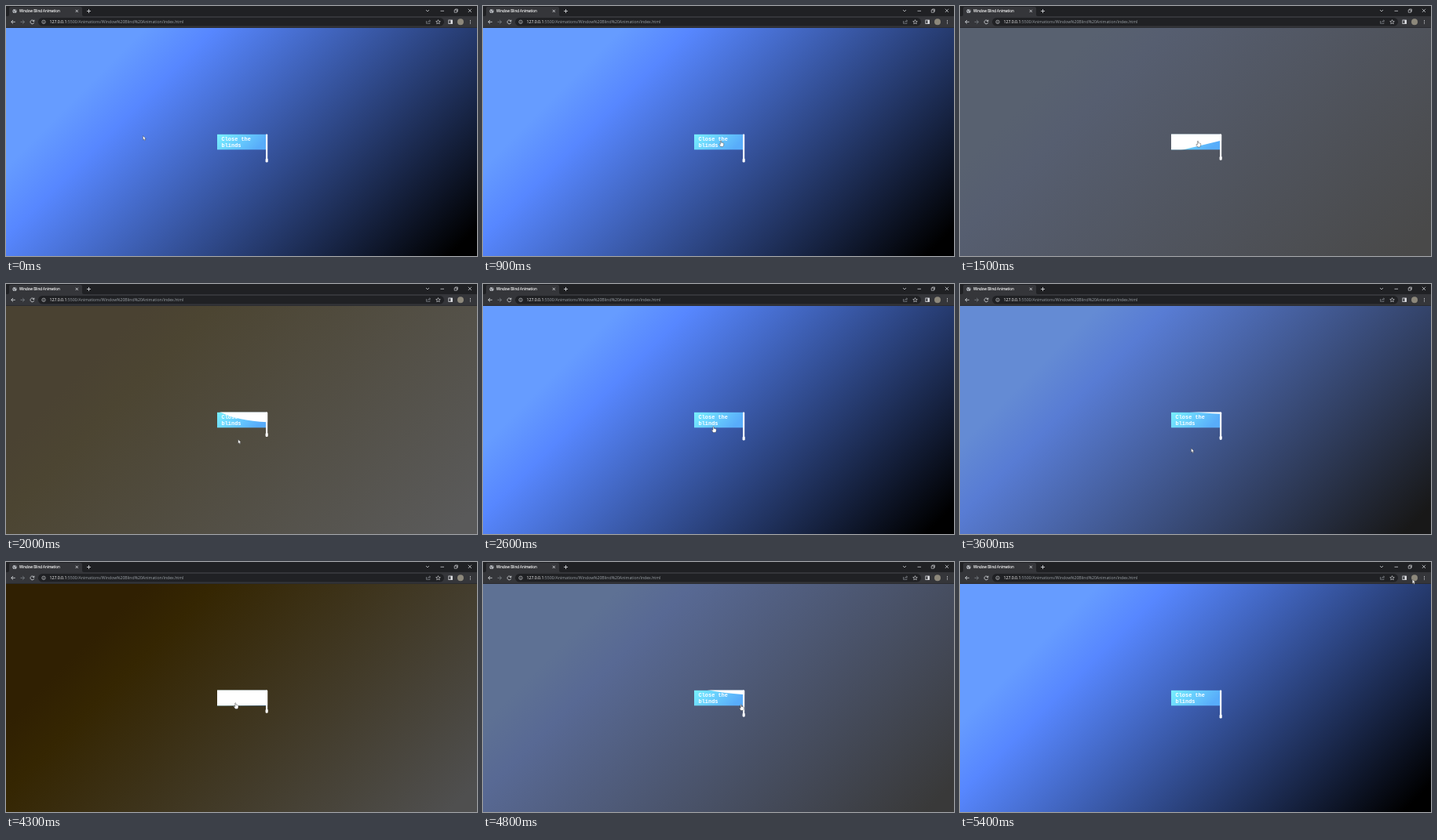
These frames come from a looping animation (600 by 319 pixels, 5500 ms). An HTML page:

```html
<!DOCTYPE html>
<html lang="en">
<head>
<meta charset="utf-8">
<title>Window Blind Animation</title>
<style>
  html, body { margin: 0; width: 100%; height: 100%; overflow: hidden; background: #202124; }
  svg { display: block; width: 600px; height: 319px; }
  .ui { font-family: "Open Sans", sans-serif; }
  .line { fill: none; stroke: #dfe1e5; stroke-width: .8; }
</style>
</head>
<body>
<svg viewBox="0 0 600 319">
  <defs>
    <linearGradient id="sky" gradientUnits="userSpaceOnUse" x1="77.25" y1="-49.75" x2="522.75" y2="395.75">
      <stop offset=".2"/><stop offset=".3"/><stop offset=".96"/>
    </linearGradient>
    <linearGradient id="glass" x1="0" y1="0" x2="1" y2=".3">
      <stop offset="0" stop-color="#78f0ff"/><stop offset="1" stop-color="#58acfa"/>
    </linearGradient>
    <clipPath id="frame"><path d="M269 163.5H332Q333.3 163.5 333.3 165V183.3H269Z"/></clipPath>
  </defs>

  <rect y="27.5" width="600" height="291.5" fill="url(#sky)"/>

  <g id="toolbar">
    <rect width="600" height="28" fill="#202124"/>
    <path d="M2 13Q4 13 4 11V3Q4 1 6 1H95Q97 1 97 3V11Q97 13 99 13H600V27.5H0V13Z" fill="#35363a"/>
    <rect x="41" y="15" width="517" height="10.6" rx="5.3" fill="#202124"/>
    <circle cx="11" cy="6.5" r="2.6" fill="#bdc1c6"/>
    <path d="M9 6l2 1.2v1.6M11.4 4.2l.6 1.4 1.2.3" fill="none" stroke="#35363a" stroke-width=".7"/>
    <g class="ui">
      <text x="17" y="8.3" font-size="4.52" fill="#fff" stroke="#fff" stroke-width=".1">Window Blind Animation</text>
      <text x="55.5" y="22.3" font-size="5.18" fill="#9aa0a6"><tspan fill="#fff">127.0.0.1</tspan>:5500/Animations/Window%20Blind%20Animation/index.html</text>
    </g>
    <g class="line">
      <path d="M88.7 4.8l3.2 3.2m0-3.2l-3.2 3.2M103 6.5h5M105.5 4v5"/>
      <path d="M535 5l2 2 2-2M553.5 6.3h4.5M588.8 3.8l4.2 4.2m0-4.2l-4.2 4.2" stroke-width=".7"/>
      <path d="M571.2 5h3.2v3.2h-3.2zM572.3 5V4h3.1v3.1h-1" stroke-width=".6"/>
      <path d="M11.7 20.3H6.8M9 18l-2.3 2.3L9 22.6"/>
      <path d="M18.5 20.3h4.9M21.2 18l2.3 2.3-2.3 2.3" stroke="#80868b"/>
      <path d="M35.5 19.2A2.4 2.4 0 1 0 35.7 21.2M35.9 17.7v1.8h-1.8"/>
      <circle cx="48" cy="20.3" r="2.2" stroke-width=".6"/>
      <path d="M48 20v1.5M48 18.9v.5" stroke-width=".6"/>
      <path d="M535.5 19v3.3h4.5v-1M537 21q.2-2 3.5-2M539.2 17.8l1.4 1.2-1.4 1.2" stroke="#9aa0a6" stroke-width=".6"/>
      <path d="M550.5 17.6l.8 1.8 2 .2-1.5 1.3.4 1.9-1.7-1-1.7 1 .4-1.9-1.5-1.3 2-.2z" stroke-width=".6"/>
      <rect x="563.9" y="18" width="4.6" height="4.6"/>
    </g>
    <rect x="566.4" y="18" width="2.2" height="4.6" fill="#dfe1e5"/>
    <circle cx="579" cy="20.3" r="4" fill="#8d887b"/>
    <path d="M591.5 18v.9m0 1v.9m0 1v.9" stroke="#dfe1e5" stroke-width="1"/>
  </g>

  <rect x="269" y="163.8" width="63" height="19.5" fill="url(#glass)"/>
  <g font-family="'Liberation Mono', 'Courier New', monospace" font-weight="bold" font-size="6.9" fill="#fff">
    <text x="274.6" y="171.8">Close the</text>
    <text x="274.6" y="180.4">blinds</text>
  </g>
  <path id="blind" fill="#fff" clip-path="url(#frame)"/>
  <g fill="#fff">
    <rect id="cord" x="331" y="163.5" width="2.2" rx=".9"/>
    <rect id="knob" x="330.6" width="3.1" height="5" rx="1.4"/>
  </g>

  <path id="arrow" d="M0 0V5.4L1.3 4.3 2.1 6.2 3 5.8 2.2 4H3.8Z" fill="#fff" stroke="#222" stroke-width=".35"/>
  <path id="hand" d="M-.6 .6Q0-.4.6.6V3Q1.3 2.4 1.7 3.1 2.4 2.6 2.8 3.4 3.6 3.1 3.7 4V5.8Q3.5 7.4 2.5 8H-.2Q-1.3 6.6-2.2 5-2.2 4-.6 5Z" fill="#fff" stroke="#222" stroke-width=".4"/>
</svg>

<script>
const LOOP = 5500, STEP = 100, FADE = 700;
const TOP = 163.8, HEIGHT = 19.5, LEFT = 269, RIGHT = 333.3;
const $ = id => document.getElementById(id);
const stops = document.querySelectorAll('#sky stop');
const skyColors = [[102, 156, 255], [87, 135, 255], [0, 0, 0]];

// [start, closed?]
const toggles = [[1330, 1], [1850, 0], [2600, 1], [3170, 0], [3750, 1], [4500, 0]];

// [time, x, y] of the pointer tip
const pointer = [
  [0, 174.5, 165.5], [150, 230, 180], [400, 384, 155], [500, 384, 155], [900, 303, 171.5],
  [1000, 303, 171.5], [1600, 303, 172], [1850, 297, 186], [2100, 295, 205], [2400, 294, 204],
  [2600, 293.5, 181.5], [3000, 293, 181], [3150, 293, 184], [3200, 292.5, 188.5],
  [3450, 295, 213], [3600, 294.5, 209.5], [3750, 292.5, 182], [4300, 292.3, 179.5],
  [4500, 293, 185], [4700, 300, 200], [5200, 576.3, 22.3], [5500, 576.3, 22.3]
];

const bezier = (a, b, s) => 3 * a * s * (1 - s) ** 2 + 3 * b * s * s * (1 - s) + s ** 3;

// The CSS "ease" curve
function ease(x) {
  if (x >= 1) return 1;
  let lo = 0, hi = 1;
  for (let i = 0; i < 24; i++) {
    const mid = (lo + hi) / 2;
    if (bezier(.25, .25, mid) < x) lo = mid; else hi = mid;
  }
  return bezier(.1, 1, lo);
}

function blindState(t) {
  let closed = 0, closing = 0;
  toggles.forEach(([start, target], i) => {
    if (t < start) return;
    const end = Math.min(t, toggles[i + 1]?.[0] ?? t);
    closed += (target - closed) * ease((end - start) / FADE);
    closing = target;
  });
  return { closed, closing };
}

function pointerAt(t) {
  const i = pointer.findIndex(p => p[0] > t);
  const [t0, x0, y0] = pointer[i - 1], [t1, x1, y1] = pointer[i];
  const k = (t - t0) / (t1 - t0), s = k * k * (3 - 2 * k);
  return [x0 + (x1 - x0) * s, y0 + (y1 - y0) * s];
}

function drawSky(closed) {
  skyColors.forEach((rgb, i) => {
    const mixed = rgb.map(v => (v * (1 - 2 * closed) + 255 * closed) * (1 - .7 * closed));
    stops[i].setAttribute('stop-color', `rgb(${mixed.map(Math.round)})`);
  });
}

// The left side runs ahead of the right in both directions.
function drawBlind({ closed, closing }) {
  const lead = closing
    ? .85 * Math.sin(Math.PI * closed)
    : -1.6 * (1 - closed) ** .4 * closed ** .73;
  const y = part => TOP + HEIGHT * part;
  const middle = closing ? closed + lead / 2 : closed + lead * .4 * (1 - closed);
  const bendX = closing ? (LEFT + RIGHT) / 2 : LEFT + 22;
  $('blind').setAttribute('d',
    `M${LEFT} ${TOP - 20}V${y(closed + lead)}Q${bendX} ${y(middle)} ${RIGHT} ${y(closed)}V${TOP - 20}Z`);
  $('blind').style.display = closed > .001 ? '' : 'none';
  const tip = 199.6 - 7 * closed;
  $('cord').setAttribute('height', tip - 165.5);
  $('knob').setAttribute('y', tip - 5);
}

function drawPointer(t) {
  const [x, y] = pointerAt(t);
  const over = x > LEFT && x < RIGHT && y > TOP && y < TOP + HEIGHT;
  for (const id of ['arrow', 'hand']) {
    $(id).setAttribute('transform', `translate(${x} ${y})`);
    $(id).style.display = (id === 'hand') === over ? '' : 'none';
  }
}

function render(time) {
  const t = Math.floor((time % LOOP) / STEP) * STEP;
  const state = blindState(t);
  drawSky(state.closed);
  drawBlind(state);
  drawPointer(t);
}

const begin = performance.now();
function tick() {
  render(performance.now() - begin);
  requestAnimationFrame(tick);
}
tick();
</script>
</body>
</html>
```
